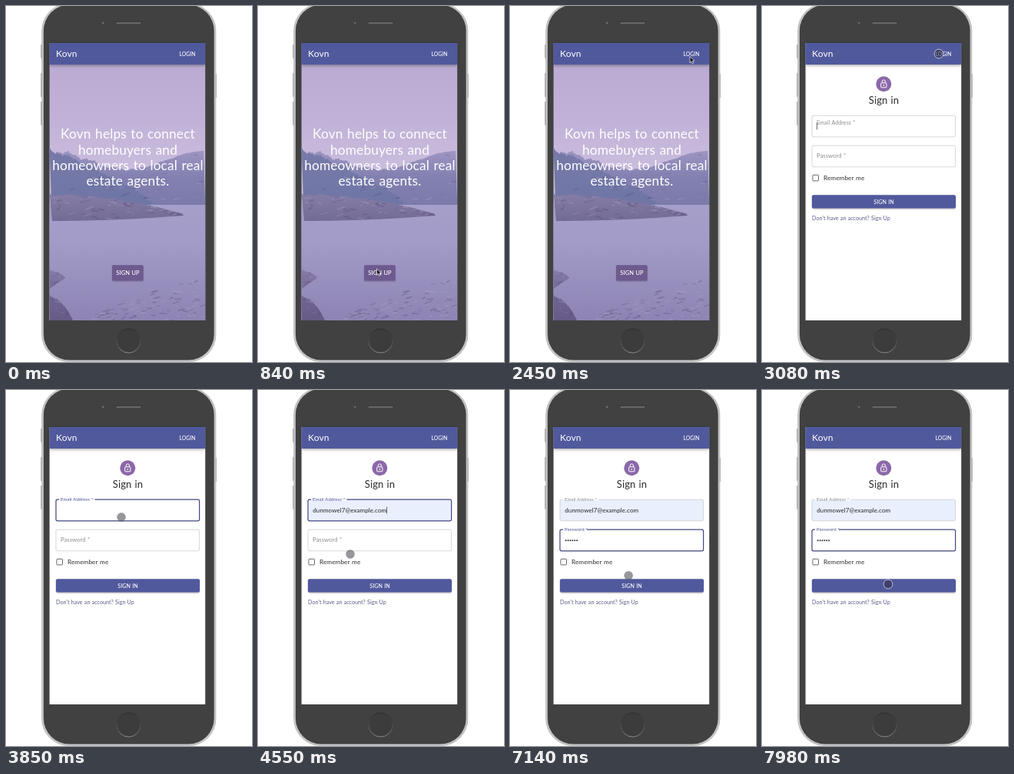
Recreate the animation shown at these times as an HTML page with a canvas. Size 320 by 462 pixels, loop 8000 ms.

```html
<!DOCTYPE html>
<html lang="en">
<head>
<meta charset="utf-8">
<title>Sign in on a phone</title>
<style>
  html, body { margin: 0; width: 100%; height: 100%; overflow: hidden; background: #fff; }
  canvas { display: block; width: 320px; height: 462px; }
</style>
</head>
<body>
<canvas id="stage"></canvas>
<script>
const W = 320, H = 462, LOOP = 8000;
const BRAND = 'Kovn', EMAIL = 'dunmowel7@example.com';
const INDIGO = '#51599d', FOCUS = '#43477f';
const LEFT = 56.6, RIGHT = 259.2, TOP = 48, BOTTOM = 408, MID = 158.5;

// Moments of the story, in ms
const PAGE = 3010, FOCUS_EMAIL = 3050, FILL_EMAIL = 4300, FOCUS_PASS = 4900;
const FIRST_KEY = 5600, KEY_GAP = 140, KEYS = 6, SUBMIT = 7840, BUSY = 7910;

const canvas = document.getElementById('stage');
const ctx = canvas.getContext('2d');
const dpr = window.devicePixelRatio || 1;
canvas.width = W * dpr;
canvas.height = H * dpr;

const clamp = x => Math.max(0, Math.min(1, x));
const mix = (a, b, p) => a + (b - a) * p;
const easeOut = p => 1 - (1 - p) ** 2;
const easeInOut = p => p * p * (3 - 2 * p);

function random(seed) {
  return () => (seed = (seed * 16807) % 2147483647) / 2147483647;
}

function paint(fill, stroke, line) {
  if (fill) { ctx.fillStyle = fill; ctx.fill(); }
  if (stroke) { ctx.strokeStyle = stroke; ctx.lineWidth = line; ctx.stroke(); }
}

function box(x, y, w, h, r, fill, stroke, line = 1) {
  ctx.beginPath();
  ctx.roundRect(x, y, w, h, r);
  paint(fill, stroke, line);
}

function disc(x, y, r, fill, stroke, line = 1) {
  ctx.beginPath();
  ctx.arc(x, y, r, 0, Math.PI * 2);
  paint(fill, stroke, line);
}

function raised(x, y, w, h, r, fill, blur, alpha) {
  ctx.save();
  ctx.shadowColor = `rgba(0,0,0,${alpha})`;
  ctx.shadowBlur = blur * dpr;
  ctx.shadowOffsetY = dpr;
  box(x, y, w, h, r, fill);
  ctx.restore();
}

function fade(y0, y1, ...colors) {
  const g = ctx.createLinearGradient(0, y0, 0, y1);
  colors.forEach((c, i) => g.addColorStop(i / (colors.length - 1), c));
  return g;
}

function text(str, x, y, size, color, align = 'left', weight = 400) {
  ctx.font = `${weight} ${size}px Lato, "Open Sans", sans-serif`;
  ctx.letterSpacing = size * 0.01 + 'px';
  ctx.wordSpacing = size * 0.05 + 'px';
  ctx.textAlign = align;
  ctx.fillStyle = color;
  ctx.fillText(str, x, y);
  return ctx.measureText(str).width;
}

function phone() {
  const silver = '#b9b9bb', key = 31;
  box(45, 50, 3, 18, 1, silver);
  for (const y of [87, 124]) box(45, y, 3, key, 1, silver);
  box(271, 88, 3, key, 1, silver);
  box(46.7, -3, 226.2, 464.6, 35, '#c6c6c9', '#a5a5a8', 0.6);
  box(48.9, -1.5, 221.8, 461, 33.5, '#414142');
  disc(126, 22, 1.3, '#6d6d70');
  box(143, 20.5, 33, 3.4, 1.7, '#666668', '#333335', 0.8);
  disc(159.5, 434.5, 15.6, '#3c3c3d', fade(419, 450, '#2b2b2d', '#4a4a4c', '#8b8b8e'));
}

function header() {
  raised(LEFT, TOP, RIGHT - LEFT, 28, 0, INDIGO, 4, 0.4);
  text(BRAND, 65, 66.2, 12.1, '#fff');
  text('LOGIN', 236, 64.8, 6.8, '#fff', 'center', 500);
}

// Rough ground between two curves of u, which runs from 0 to 1 across it
function land({ from = LEFT, to = RIGHT, top, bottom, colors, rough = 1, grain = 0 }) {
  const jag = x => rough * (Math.sin(x * 0.21) + 0.7 * Math.sin(x * 0.53) + 0.5 * Math.sin(x * 1.3));
  const edge = u => top(u) + jag(mix(from, to, u)) * (1 - u);
  ctx.beginPath();
  for (let u = 0; u <= 1; u += 0.01) ctx.lineTo(mix(from, to, u), edge(u));
  for (let u = 1; u >= 0; u -= 0.02) ctx.lineTo(mix(from, to, u), bottom(u));
  ctx.closePath();
  paint(fade(top(0), bottom(0), ...colors));

  ctx.save();
  ctx.clip();
  const rnd = random(Math.round(from + to) * 31);
  for (let i = 0; i < grain; i++) {
    const u = rnd(), x = mix(from, to, u), y = mix(edge(u), bottom(u), rnd());
    ctx.beginPath();
    ctx.moveTo(x, y);
    ctx.lineTo(x + 3 + rnd() * 7, y + (rnd() - 0.65) * 6);
    paint(null, i % 2 ? 'rgba(175,162,198,.3)' : 'rgba(75,62,108,.28)', 0.6 + rnd() * 1.4);
  }
  ctx.restore();
}

function scenery() {
  const width = RIGHT - LEFT, shore = () => 259, foot = () => BOTTOM;
  box(LEFT, TOP, width, BOTTOM - TOP, 0, fade(76, 215, '#bbabd3', '#c1b1d8', '#cabddd'));
  land({ top: u => 200 - 12 * Math.cos(u * Math.PI * 2), bottom: shore,
    colors: ['#9d95c2', '#8280b0', '#7b7aa9'], rough: 2, grain: 30 });
  land({ to: 190, top: u => mix(187, 252, u ** 1.2), bottom: shore,
    colors: ['#777aa8', '#6e76a6'], rough: 2, grain: 25 });
  box(LEFT, 258, width, BOTTOM - 258, 0, fade(258, BOTTOM, '#a59fca', '#a29ac7', '#978fbd', '#8d84b3'));
  land({ to: 231, top: u => mix(245, 270, u * u), bottom: u => mix(279, 272, u * u),
    colors: ['#857ca5', '#726b94'], grain: 70 });
  land({ to: 77, top: u => mix(343, 352, u * u), bottom: u => mix(367, 353, u), colors: ['#857ba6', '#776d99'], grain: 8 });
  land({ from: 78, to: 104, top: u => 352 - 3 * Math.sin(u * Math.PI), bottom: u => 352 + 4 * Math.sin(u * Math.PI),
    colors: ['#857ba6', '#776d99'], rough: 0.3 });
  land({ to: 87, top: u => mix(377, BOTTOM, u * u), bottom: foot, colors: ['#716594', '#665a87'], grain: 10 });
  land({ from: 108, top: u => mix(BOTTOM, 350, u ** 0.7), bottom: foot, colors: ['#897fa8', '#897fa8'], grain: 110 });
}

function landing() {
  scenery();
  [BRAND + ' helps to connect', 'homebuyers and', 'homeowners to local real', 'estate agents.']
    .forEach((line, i) => text(line, MID, 172.3 + i * 20.2, 17.25, '#fff', 'center'));
  raised(138, 336.3, 40.7, 20.2, 1.5, '#6d5a8e', 1.5, 0.2);
  text('SIGN UP', MID, 349.2, 7.5, '#fff', 'center', 500);
}

function lock(x, y) {
  disc(x, y, 10, '#8b68a9');
  box(x - 3.6, y - 1.4, 7.2, 6, 0.7, null, '#fff');
  ctx.beginPath();
  ctx.moveTo(x - 2.1, y - 1.6);
  ctx.arc(x, y - 3.2, 2.1, Math.PI, 0);
  ctx.lineTo(x + 2.1, y - 1.6);
  ctx.stroke();
  disc(x, y + 1.6, 0.9, '#fff');
}

function field(label, y, focusAt, t, focused, filled) {
  const float = easeOut(clamp((t - focusAt) / 200));
  const raisedLabel = float > 0.5, active = focused && raisedLabel;
  box(65, y, 186.6, 27.6, 2, filled ? '#e9effc' : '#fff', active ? FOCUS : '#c6c6c8', active ? 1.2 : 0.7);
  if (raisedLabel) box(69, y - 1, label.length * 3.1, 2, 0, '#fff');
  text(label, 71, y + mix(16.2, 2, float), mix(7.6, 6, float), active ? '#5a609f' : '#8b8b8f');
}

function caret(x, y, t, since) {
  if (Math.floor((t - since) / 530) % 2 === 0) box(x, y - 4.6, 0.7, 9.2, 0, '#333');
}

function signIn(t) {
  box(LEFT, TOP, RIGHT - LEFT, BOTTOM - TOP, 0, '#fff');
  lock(158.3, 101.2);
  text('Sign in', MID, 127, 13, '#2b2b2b', 'center');

  const onPass = t >= FOCUS_PASS, onEmail = t >= FOCUS_EMAIL && !onPass;
  const filled = t >= FILL_EMAIL;
  field('Email Address *', 142.2, FOCUS_EMAIL, t, onEmail, filled);
  const emailWidth = filled ? text(EMAIL, 71.3, 158.8, 8, '#25252c') : 0;
  if (onEmail) caret(71.3 + emailWidth, 156, t, filled ? FILL_EMAIL : FOCUS_EMAIL);

  field('Password *', 181.2, FOCUS_PASS, t, onPass, false);
  const typed = Math.max(0, Math.min(KEYS, Math.floor((t - FIRST_KEY) / KEY_GAP) + 1));
  for (let i = 0; i < typed; i++) disc(72.8 + i * 2.85, 195.2, 0.95, '#25252c');
  const lastKey = typed ? FIRST_KEY + (typed - 1) * KEY_GAP : FOCUS_PASS;
  if (onPass) caret(71.5 + typed * 2.85, 195, t, lastKey);

  box(65.9, 219.3, 7.6, 7.6, 0.8, '#fff', '#666');
  text('Remember me', 80, 226, 8.2, '#2e2e2e');

  raised(65, 245.3, 187, 17.2, 2, INDIGO, 2, 0.3);
  if (t < BUSY) text('SIGN IN', MID, 256.6, 7.1, '#fff', 'center', 500);
  text("Don't have an account? Sign Up", 65, 277.6, 7.05, '#585c86');
}

// Each move glides from the place before it
const MOVES = [
  { at: 0, time: 1, x: 190, y: 462 },
  { at: 300, time: 500, x: 154.5, y: 341 },
  { at: 1600, time: 700, x: 234, y: 65.5 },
  { at: 2660, time: 150, x: 230, y: 62 },
  { at: 3200, time: 500, x: 150, y: 165 },
  { at: 4300, time: 250, x: 120, y: 213 },
  { at: 4600, time: 250, x: 115, y: 196 },
  { at: 6500, time: 900, x: 164, y: 252 },
];

function place(t) {
  let x = 0, y = 0;
  for (const m of MOVES) {
    const p = easeInOut(clamp((t - m.at) / m.time));
    x = mix(x, m.x, p);
    y = mix(y, m.y, p);
  }
  return [x, y];
}

const ARROW = new Path2D('M0 0V8L1.9 6.4 3.2 9.3 4.6 8.7 3.4 5.9 5.8 5.7Z');

function arrow(x, y) {
  ctx.save();
  ctx.translate(x, y);
  ctx.fillStyle = '#111';
  ctx.fill(ARROW);
  ctx.strokeStyle = '#fff';
  ctx.lineWidth = 0.7;
  ctx.stroke(ARROW);
  ctx.restore();
}

function touch(x, y, pressed) {
  if (pressed) disc(x, y, 5.9, 'rgba(48,48,70,.58)', 'rgba(215,215,228,.8)');
  else disc(x, y, 5.5, 'rgba(80,80,88,.6)', 'rgba(110,110,116,.5)', 0.6);
}

function pointer(t) {
  const within = (a, b) => t >= a && t < b;
  if (within(300, 2660)) arrow(...place(t));
  else if (within(2660, 5500) || t >= 6500) {
    const pressed = within(2850, 3150) || within(4850, 4960) || t >= SUBMIT;
    touch(...place(t), pressed);
  }
}

function draw(t) {
  ctx.setTransform(dpr, 0, 0, dpr, 0, 0);
  ctx.fillStyle = '#fff';
  ctx.fillRect(0, 0, W, H);
  phone();
  if (t < PAGE) landing();
  else signIn(t);
  header();
  pointer(t);
}

const start = performance.now();
function tick() {
  draw((performance.now() - start) % LOOP);
  requestAnimationFrame(tick);
}
tick();
</script>
</body>
</html>
```
